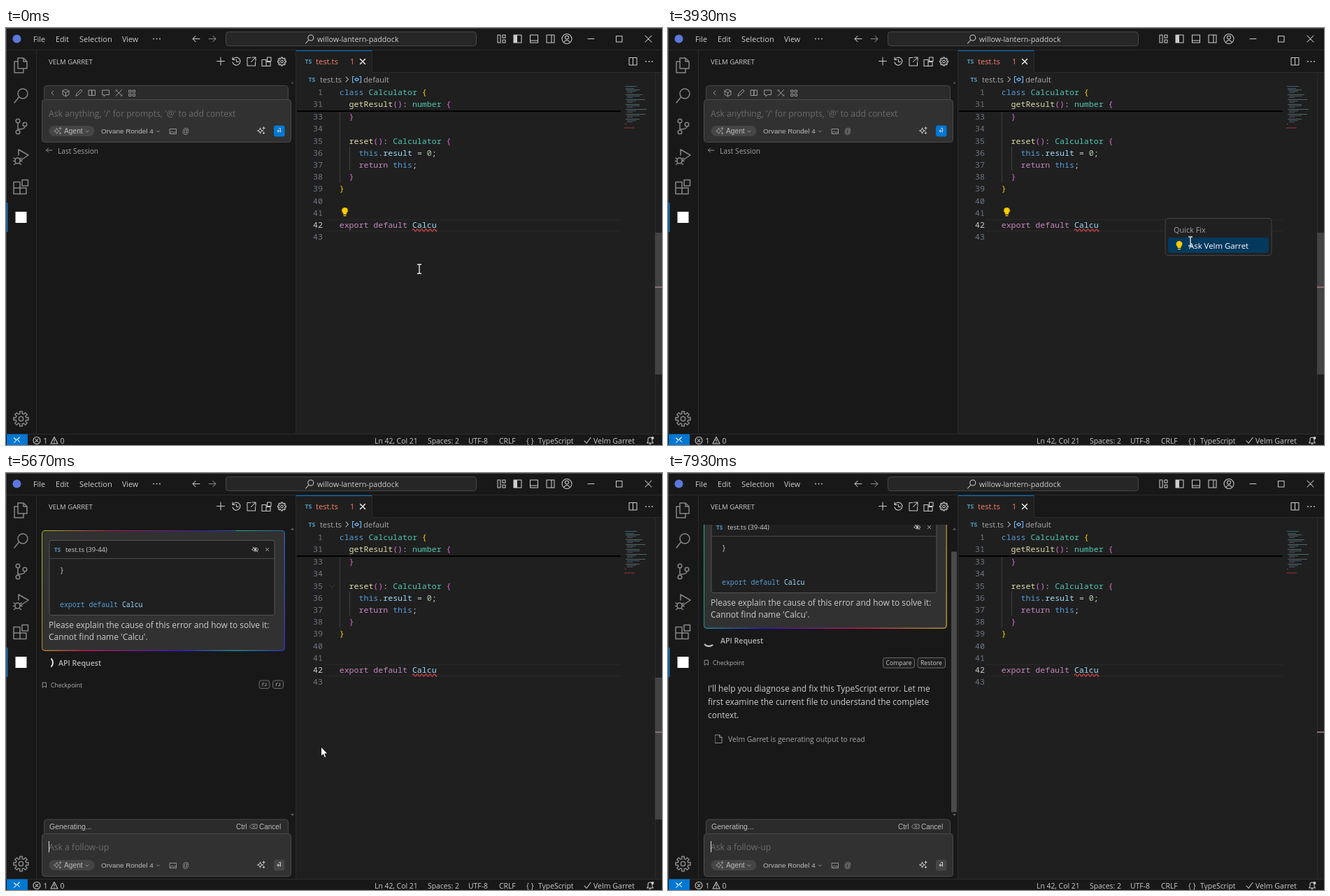
Animation, 938 px wide and 597 px high, one loop 8 s. Source, as an HTML page:

```html
<!DOCTYPE html>
<html lang="en">
<head>
<meta charset="utf-8">
<title>Quick fix walkthrough</title>
<style>
html, body { margin: 0; width: 100%; height: 100%; overflow: hidden; background: #1f1f1f; }
#stage { position: relative; width: 938px; height: 597px; overflow: hidden; }
#stage > svg { position: absolute; left: 0; top: 0; }
text { white-space: pre; fill: #ccc; font: 10.7px "Open Sans", sans-serif; }
.mono text, text.mono { font: 500 11.58px "Noto Sans Mono", monospace; }
.nums text { fill: #6e7681; text-anchor: end; }
.bar text { font-size: 10.4px; }
.arial { font: 10px "Liberation Sans", sans-serif; fill: #bbb; }
.ts { font-size: 8.6px; font-weight: 700; fill: #519aba; }
.i { fill: none; stroke: #ccc; stroke-width: 1.05; stroke-linecap: round; stroke-linejoin: round; }
.big { stroke: #868686; stroke-width: 1.5; }
.dim { stroke: #9d9d9d; stroke-width: .9; }
.gear { vector-effect: non-scaling-stroke; }
.k { fill: #569cd6; } .t { fill: #4ec9b0; } .f { fill: #dcdcaa; } .b { fill: #ffd700; }
.p { fill: #da70d6; } .c { fill: #c586c0; } .v { fill: #9cdcfe; } .n { fill: #b5cea8; }

/* one shared 8 s clock */
.a { animation: 8s linear infinite both; }
.cut { animation-timing-function: step-end; }
.start { animation-name: start; }
.busy { animation-name: busy; }
.tip { animation-name: tip; }
.menu { animation-name: menu; }
.thumb { animation-name: thumb; }
.fold { animation-name: fold; }
.beam { animation-name: beam; }
.arrow { animation-name: arrow; }
.caret { animation-name: caret; }
.dot2 { animation-name: dot2; }
.dot3 { animation-name: dot3; }
.wide { animation-name: wide; }
.tight { animation-name: tight; }
.late { animation-name: late; }
.type { animation-name: type; animation-timing-function: steps(7); }
#cursor { animation-name: move; }
#scroll { animation-name: scroll; animation-timing-function: step-end; }
@keyframes start { 0% { opacity: 1; } 52.125%, 100% { opacity: 0; } }
@keyframes busy { 0% { opacity: 0; } 52.125%, 100% { opacity: 1; } }
@keyframes tip { 0%, 12.5% { opacity: 0; } 15%, 34.99% { opacity: 1; } 35%, 100% { opacity: 0; } }
@keyframes menu { 0% { opacity: 0; } 35% { opacity: 1; } 50.875%, 100% { opacity: 0; } }
@keyframes thumb { 0%, 87.5% { opacity: 1; } 97.5%, 100% { opacity: 0; } }
@keyframes fold { 0%, 70% { opacity: 0; } 76.3%, 84.4% { opacity: 1; } 87.5%, 100% { opacity: 0; } }
@keyframes beam { 0% { opacity: 1; } 24.4% { opacity: 0; } 49.125% { opacity: 1; } 70%, 100% { opacity: 0; } }
@keyframes arrow { 0% { opacity: 0; } 24.4% { opacity: 1; } 49.125% { opacity: 0; } 70%, 100% { opacity: 1; } }
@keyframes caret {
  0% { opacity: 0; } 52.125% { opacity: 1; } 61.875% { opacity: 0; } 68.125% { opacity: 1; }
  74.375% { opacity: 0; } 80.625% { opacity: 1; } 86.875% { opacity: 0; } 93.125% { opacity: 1; } 99.375%, 100% { opacity: 0; }
}
@keyframes dot2 { 0% { fill: transparent; } 60.46% { fill: #bbb; } 77.13% { fill: transparent; } 85.46%, 100% { fill: #bbb; } }
@keyframes dot3 { 0% { fill: transparent; } 68.8% { fill: #bbb; } 77.13% { fill: transparent; } 93.8%, 100% { fill: #bbb; } }
@keyframes wide { 0% { opacity: 1; } 70% { opacity: 0; } 73.4%, 100% { opacity: 1; } }
@keyframes tight { 0% { opacity: 0; } 70% { opacity: 1; } 73.4%, 100% { opacity: 0; } }
@keyframes late { 0% { opacity: 0; } 95%, 100% { opacity: 1; } }
@keyframes type { 0%, 88.5% { clip-path: inset(0 100% 0 0); } 90.3%, 100% { clip-path: inset(0); } }
@keyframes scroll { 0% { transform: none; } 95%, 100% { transform: translateY(-32px); } }
@keyframes glow { 0%, 52.125% { background-position: 0 0; } 100% { background-position: 708.5px 0; } }
@keyframes spin {
  0%, 52.125% { transform: rotate(0); } 55.249% { transform: rotate(90deg); }
  55.25% { transform: rotate(0); } 100% { transform: rotate(1288.8deg); }
}
@keyframes move {
  0%, .875% { transform: translate(591px, 345px); }
  3.1% { transform: translate(576px, 318px); }
  5% { transform: translate(573px, 298px); }
  7.5%, 20.875% { transform: translate(588px, 285px); }
  25% { transform: translate(640px, 272px); }
  28.1% { transform: translate(727px, 262px); }
  30%, 35% { transform: translate(722px, 255px); animation-timing-function: ease-in-out; }
  42.5%, 61.6% { transform: translate(747px, 305.5px); animation-timing-function: ease-in-out; }
  70.4%, 83.75% { transform: translate(450px, 392px); }
  87.5% { transform: translate(400px, 440px); }
  93.4% { transform: translate(396px, 535px); }
  96.5%, 100% { transform: translate(394px, 604px); }
}

#chat { position: absolute; left: 44px; top: 74px; width: 361px; height: 416px; overflow: hidden; }
#scroll { position: absolute; left: -44px; top: -74px; width: 405px; height: 597px; }
#scroll > * { position: absolute; }
#scroll > svg { left: 0; top: 0; }
#msg {
  left: 50.5px; top: 81.5px; width: 348px; height: 173.5px; border-radius: 5px;
  background: repeating-linear-gradient(101.79deg, #1bbe84 0%, #331bbe 16%, #be1b55 33%, #a6be1b 55%, #be1b55 67%, #331bbe 85%, #1bbe84 99%) 0 0 / 200% 200%;
  animation-name: glow;
}
#spin {
  left: 49px; top: 261.5px; width: 15px; height: 15px; border: 2px solid transparent;
  border-top-color: #e4e4e4; border-radius: 50%; animation-name: spin;
}
#cursor { position: absolute; left: 0; top: 0; width: 1px; height: 1px; overflow: visible; }
</style>
</head>
<body>
<div id="stage">
<svg width="938" height="597">
  <defs>
    <g id="gear"><path id="teeth" class="gear"/><circle class="gear" r="1.8"/></g>
    <path id="blocks" d="M-6-3H0V6H-6zM0 0H6V6H-6M1.5-6.5H7V-1H1.5z"/>
    <g id="bulb" fill="#ffcc00">
      <path d="M0-6a4.3 4.3 0 0 1 2.4 7.9V4H-2.4V1.9A4.3 4.3 0 0 1 0-6z"/>
      <path d="M-2 5H2V6.3H-2z"/>
    </g>
    <path id="spark" d="M-1.5-3.5Q-1 0 2.5 .5Q-1 1-1.5 4.5Q-2 1-5.5 .5Q-2 0-1.5-3.5zM3.5-5V-1.5M1.8-3.2H5.2M3.5 2.5V5M2.2 3.8H4.8"/>
    <path id="down" d="M-2-1 0 1 2-1"/>
    <g id="composer">
      <rect x="51.5" y="102.5" width="356" height="61" rx="4" fill="#313131" stroke="#4b4b4b"/>
      <rect x="61.5" y="140" width="65" height="15" rx="7.5" fill="#454545"/>
      <use href="#spark" class="i dim" x="74" y="147"/>
      <text class="arial" x="83" y="150.5" style="font-size:10.2px">Agent</text>
      <use href="#down" class="i dim" x="116" y="148"/>
      <text class="arial" x="136" y="150.5" style="font-size:9.9px">Orvane Rondel 4</text>
      <use href="#down" class="i dim" x="217.5" y="148"/>
      <path class="i dim" d="M234.5 144.5h9v7h-9zM234.5 151l3-3 2 2 2-1.5 2 2"/>
      <text class="arial" x="252" y="151" style="fill:#9d9d9d">@</text>
      <use href="#spark" class="i" x="365" y="146.5"/>
    </g>
    <path id="enter" class="i" d="M388.5 147.5h4v-4h-2M390 145.5l-2 2 2 2M392.5 147.5v1.5"/>
  </defs>

  <!-- window frame -->
  <path fill="#181818" d="M0 0H938V64H415V597H0zM415 581H938V597H415z"/>
  <path fill="#1f1f1f" d="M415 32H523V64H415z"/>
  <path fill="none" stroke="#2b2b2b" d="M0 31.5H938M43.5 32V581M414.5 32V581M0 581.5H938M523.5 32V63.5H938"/>
  <path fill="none" stroke="#4a4a4a" d="M0 .5H938M.5 0V581"/>
  <path fill="#0078d4" d="M415 32H523V33H415zM1 250H2.5V292H1zM1 581.5H31V597H1z"/>
  <circle cx="15.5" cy="15.5" r="6" fill="#5c78dc"/>
  <text x="39" y="20">File</text><text x="71" y="20">Edit</text>
  <text x="105" y="20" style="font-size:11.1px">Selection</text><text x="166" y="20">View</text>
  <g fill="#ccc"><circle cx="211" cy="15.5" r=".9"/><circle cx="215.5" cy="15.5" r=".9"/><circle cx="220" cy="15.5" r=".9"/>
    <circle cx="915" cy="48" r=".9"/><circle cx="919.5" cy="48" r=".9"/><circle cx="924" cy="48" r=".9"/></g>
  <path class="i" d="M277 15.5H267M271 11.5l-4 4 4 4"/>
  <path class="i" style="stroke:#8a8a8a" d="M290 15.5H300M296 11.5l4 4-4 4"/>
  <rect x="314.5" y="5.5" width="358" height="20" rx="4" fill="#262626" stroke="#484848"/>
  <path class="i" d="M432.5 17.5l-4 4.5M431.8 14a4 4 0 1 1 8 0a4 4 0 1 1-8 0z"/>
  <text x="445" y="19.5">willow-lantern-paddock</text>
  <path class="i" d="M703 10h4v11h-4zM710 10h4v4h-4zM710 17h4v4h-4zM726 10h11v11h-11zM749.5 10h11v11h-11zM749.5 18h11M773 10h11v11h-11zM780 10v11"/>
  <path fill="#ccc" d="M726 10h5v11h-5z"/>
  <g class="i"><circle cx="802" cy="15.5" r="7"/><circle cx="802" cy="13.5" r="2.5"/><path d="M797.5 20.5q4.5-6 9 0M832 15.5h9M872.5 11.5h8.5v8.5h-8.5zM914 11l9 9M923 11l-9 9"/></g>

  <!-- activity bar -->
  <g class="i big">
    <path d="M17 43h8l5 5v10H17zM25 43v5h5M17 48h-5v16h13v-6"/>
    <path d="M18 99.5 12 107M17 94a7 7 0 1 1 14 0a7 7 0 1 1-14 0z"/>
    <circle cx="17" cy="133" r="2.8"/><circle cx="17" cy="149" r="2.8"/><circle cx="27" cy="138" r="2.8"/>
    <path d="M17 136v10M27 141q0 4-10 4"/>
    <path d="M18 182v-8l14 8-12 8M13 190q0-4 3.5-4t3.5 4q0 4-3.5 4t-3.5-4zM11 186l2.5 2M22 186l-2.5 2M10.5 190.5h2.5M20 190.5h3M11.5 195.5l2.5-2M21.5 195.5l-2.5-2"/>
    <path d="M11 220.5h9v17h-9zM11 229h18v8.5H11M23 217.5h8.5v8.5H23z"/>
    <use href="#gear" transform="translate(21.5 559.5) scale(1.75)"/>
  </g>
  <rect x="13.5" y="263" width="16" height="16" fill="#fff"/>

  <!-- side bar -->
  <text x="61" y="51.5" style="font-size:9.6px">VELM GARRET</text>
  <g class="i">
    <path d="M307 42v11M301.5 47.5h11M324.5 45a5.5 5.5 0 1 1-.5 4M324 42v3.5h3.5M329.5 45v3.5h3M350 42.5h-5v11.5h11.5v-5.5M352 42h5v5M357 42l-6.5 6.5"/>
    <use href="#blocks" x="372" y="48.5"/><use href="#gear" transform="translate(394.5 48)"/>
  </g>
  <g class="a cut start">
    <path d="M54.5 102V86.5a4 4 0 0 1 4-4H399.5a4 4 0 0 1 4 4V102" fill="#2b2b2b" stroke="#484848"/>
    <use href="#composer"/>
    <g class="i" style="stroke:#a8a8a8;stroke-width:.9">
      <path d="M68 90l-3 3 3 3M85.5 88l4.5 2.3v5l-4.5 2.5-4.5-2.5v-5zM81 90.3l4.5 2.4 4.5-2.4M85.5 92.7v5M100 97l1-3 6-6 2 2-6 6zM118.5 89h4.5v7.5h-4.5zM123 89h4.5v7.5h-4.5zM138 89h9.5v6.5h-5l-2.5 2.5v-2.5h-2zM157 88.5l9 9M165.5 88.5l-8.5 9M157 90.5l2-2M164 97.5l2-2"/>
      <path d="M176 89h3v3h-3zM181.5 89h3v3h-3zM176 94.5h3v3h-3zM181.5 94.5h3v3h-3z"/>
    </g>
    <text x="61" y="126.5" style="font-size:12.2px;fill:#6c6c6c">Ask anything, '/' for prompts, '@' to add context</text>
    <rect x="383" y="139.5" width="15.5" height="16" rx="3" fill="#0078d4"/><use href="#enter"/>
    <path class="i dim" d="M66 175H57.5M60.5 172l-3 3 3 3"/>
    <text x="74" y="179.5" style="font-size:10.2px;fill:#a2a2a2">Last Session</text>
    <circle cx="409.5" cy="78.5" r="1.5" fill="#4a4a4a"/>
  </g>
  <g class="a cut busy">
    <path d="M54.5 516V500a4 4 0 0 1 4-4H399.5a4 4 0 0 1 4 4V516" fill="#2b2b2b" stroke="#484848"/>
    <use href="#composer" y="414"/>
    <text class="arial" x="62" y="510" style="font-size:10.5px">Generating.<tspan class="a cut dot2">.</tspan><tspan class="a cut dot3">.</tspan></text>
    <text class="arial" x="329" y="509.5">Ctrl</text><text class="arial" x="362" y="509.5">Cancel</text>
    <path class="i dim" d="M348.5 506l3-3h7.5v6h-7.5zM353 504.5l3 3M356 504.5l-3 3"/>
    <text x="61" y="540" style="font-size:12.2px;fill:#6c6c6c">Ask a follow-up</text>
    <path class="a cut caret" d="M61.5 527V543" stroke="#ddd"/>
    <rect x="383" y="553.5" width="15.5" height="16" rx="3" fill="#454545"/><use href="#enter" y="414"/>
    <path fill="#606060" d="M407 81.5l2.5-3 2.5 3zM407 488l2.5 3 2.5-3z"/>
    <rect class="a cut late" x="405" y="112.5" width="8" height="373" fill="#4a4a4a"/>
  </g>

  <!-- editor -->
  <text class="ts" x="427.5" y="50.5">TS</text><text x="443" y="52" style="font-size:11.2px;fill:#f88070">test.ts</text>
  <text x="492" y="52" style="fill:#f88070">1</text>
  <path class="i" style="stroke:#fff;stroke-width:1.3" d="M506.5 44.5l7 7M513.5 44.5l-7 7"/>
  <path class="i" d="M891 42.5h11v10.5h-11zM896.5 42.5v10.5"/>
  <text class="ts" x="432.5" y="76.5">TS</text><text x="449" y="78" style="font-size:10.9px;fill:#a9a9a9">test.ts</text>
  <path class="i" d="M486 70l3.5 3.5-3.5 3.5"/>
  <path class="i" style="stroke:#75beff" d="M497.5 69.5h-2v8.5h2M505.5 69.5h2v8.5h-2M498.5 73.5l3-2 3 2-3 2.5z"/>
  <text x="511" y="78" style="font-size:11.2px;fill:#a9a9a9">default</text>
  <path stroke="#292929" d="M455 274.5H879M455 290.5H879"/>
  <path stroke="#404040" d="M477.5 120V221M491.5 170V204"/>
  <path stroke="#000" stroke-width="2" d="M416 119H879"/>
  <rect class="a tip" x="581" y="274" width="35" height="17" fill="#213040"/>
  <g class="mono nums" id="nums"></g>
  <g class="mono">
    <text x="476.7" y="95.5"><tspan class="k">class</tspan> <tspan class="t">Calculator</tspan> <tspan class="b">{</tspan></text>
    <text x="490.6" y="113"><tspan class="f">getResult</tspan><tspan class="p">()</tspan>: <tspan class="t">number</tspan> <tspan class="p">{</tspan></text>
    <text x="490.6" y="131.2" class="p">}</text>
    <text x="490.6" y="165.6"><tspan class="f">reset</tspan><tspan class="p">()</tspan>: <tspan class="t">Calculator</tspan> <tspan class="p">{</tspan></text>
    <text x="504.5" y="182.8"><tspan class="k">this</tspan>.<tspan class="v">result</tspan> = <tspan class="n">0</tspan>;</text>
    <text x="504.5" y="200"><tspan class="c">return</tspan> <tspan class="k">this</tspan>;</text>
    <text x="490.6" y="217.2" class="p">}</text>
    <text x="476.7" y="234.4" class="b">}</text>
    <text x="476.7" y="286"><tspan class="c">export default</tspan> <tspan class="v">Calcu</tspan></text>
  </g>
  <path fill="none" stroke="#f14c4c" stroke-width="1.1" d="M581 289.5q1.5-3.5 3 0t3 0 3 0 3 0 3 0 3 0 3 0 3 0 3 0 3 0 3 0 2 0"/>
  <use href="#bulb" class="a cut start" x="484.5" y="263"/>
  <path class="i a fold" d="M462.5 160l4 4 4-4"/>
  <g id="map" opacity=".6"></g>
  <path stroke="#2b2b2b" d="M928.5 64V581"/>
  <rect class="a thumb" x="928" y="293" width="10" height="203" fill="#434343"/>
  <path stroke="#8f6e6e" stroke-width="2" d="M928 371H938"/>

  <!-- status bar -->
  <g class="bar">
    <path class="i" style="stroke:#fff" d="M11.5 587l3.5 3-3.5 3.5M19.5 586l-3.5 3 3.5 3.5"/>
    <g class="i"><circle cx="44" cy="590.5" r="5"/><path d="M42 588.5l4 4M46 588.5l-4 4M69 585.5l5 9.5H64zM69 589v3M69 593.5v.2"/></g>
    <text x="53.5" y="594.5">1</text><text x="77.5" y="594.5">0</text>
    <text x="527" y="594.5">Ln 42, Col 21</text><text x="603" y="594.5">Spaces: 2</text>
    <text x="661" y="594.5">UTF-8</text><text x="705" y="594.5">CRLF</text>
    <text x="744" y="594.5">{ }</text><text x="761" y="594.5">TypeScript</text>
    <path class="i" d="M827 591l3 3.5 6-8M916.5 594h9l-1.5-2v-3q0-3-3-3t-3 3v3zM920 595.5h2"/>
    <circle cx="924.5" cy="587" r="2" fill="#ccc"/>
    <text x="840" y="594.5" style="font-size:10.6px">Velm Garret</text>
  </g>

  <!-- hover and menu -->
  <g class="a tip">
    <rect x="581.5" y="201.5" width="251" height="71" rx="2" fill="#202020" stroke="#454545"/>
    <path fill="#282828" d="M582 251.5H832V272H582z"/>
    <path stroke="#3c3c3c" d="M582 225.5H832M582 251.5H832"/>
    <g class="mono"><text x="588" y="217.5">Cannot find name 'Calcu'. <tspan fill="#8f8f8f">ts(2304)</tspan></text>
      <text x="588" y="242.5" class="v">any</text></g>
    <text x="588" y="265.5" style="fill:#4daafc;font-size:10.6px">View Problem (Alt+F8)</text>
    <text x="710" y="265.5" style="fill:#4daafc;font-size:10.4px">Quick Fix... (Ctrl+.)</text>
  </g>
  <g class="a cut menu">
    <rect x="711" y="272.5" width="152" height="53" rx="4" fill="#202020" stroke="#454545"/>
    <rect x="715" y="300" width="144" height="22" rx="3" fill="#04395e"/>
    <text x="723" y="292.5" style="font-size:10.9px;fill:#a0a0a0">Quick Fix</text>
    <use href="#bulb" x="731" y="311"/>
    <text x="745" y="316" style="font-size:11.4px;fill:#fff">Ask Velm Garret</text>
  </g>
</svg>

<div id="chat" class="a cut busy">
  <div id="scroll" class="a">
    <div id="msg" class="a"></div>
    <div id="spin" class="a"></div>
    <svg width="405" height="597">
      <rect x="52" y="83" width="345.5" height="170.5" rx="4" fill="#313131"/>
      <rect x="62" y="96.5" width="322" height="107" rx="3" fill="#1f1f1f" stroke="#545454"/>
      <path stroke="#484848" d="M62 122.5H384"/>
      <text class="ts" x="69" y="112.5" style="font-size:8px">TS</text>
      <text x="85" y="113" style="font-size:9.5px">test.ts (39-44)</text>
      <path class="i" style="stroke-width:.9" d="M352 109.5q4.5-5.5 9 0q-4.5 5.5-9 0zM353 106l7 7M371.5 107.5l4 4M375.5 107.5l-4 4"/>
      <circle class="i" cx="356.5" cy="109.5" r="1.3"/>
      <text class="mono" x="77" y="143" style="font-size:9.9px">}</text>
      <text class="mono" x="77" y="192" style="font-size:9.9px"><tspan class="k">export default</tspan> <tspan class="v">Calcu</tspan></text>
      <g style="--s:11.95px">
        <text x="61" y="222" style="font-size:var(--s)">Please explain the cause of this error and how to solve it:</text>
        <text x="61" y="239" style="font-size:var(--s)">Cannot find name 'Calcu'.</text>
        <text class="a type" x="57" y="344.5" style="font-size:var(--s)">I'll help you diagnose and fix this TypeScript error. Let me</text>
        <text class="a type" x="57" y="363.5" style="font-size:var(--s);animation-delay:.14s">first examine the current file to understand the complete</text>
        <text class="a type" x="57" y="382.5" style="font-size:var(--s);animation-delay:.28s">context.</text>
      </g>
      <text x="75" y="275.5" style="font-size:10.6px;font-weight:600;fill:#b4b4b4">API Request</text>
      <path class="i dim" d="M52.5 300h5v7l-2.5-2-2.5 2z"/>
      <text x="64" y="307" style="font-size:8.6px;fill:#b0b0b0">Checkpoint</text>
      <g class="a cut wide">
        <rect x="307.5" y="296.5" width="45" height="14.5" rx="3" fill="#1f1f1f" stroke="#6a6a6a"/>
        <rect x="357" y="296.5" width="39.5" height="14.5" rx="3" fill="#1f1f1f" stroke="#6a6a6a"/>
        <text x="311.5" y="307" style="font-size:8.7px">Compare</text><text x="361" y="307" style="font-size:8.7px">Restore</text>
      </g>
      <g class="a cut tight">
        <rect x="362" y="297" width="15" height="11.5" rx="3" fill="#1f1f1f" stroke="#6a6a6a"/>
        <rect x="381.5" y="297" width="15" height="11.5" rx="3" fill="#1f1f1f" stroke="#6a6a6a"/>
        <path class="i dim" d="M367 304.5v-3.5h2M372 301v3.5h-2M386.5 304.5v-3.5h2M391.5 301v3.5h-2"/>
      </g>
      <g class="a cut late">
        <path class="i dim" d="M67.5 407h6l3.5 3.5v8h-9.5zM73.5 407v3.5h3.5"/>
        <text x="86" y="417" style="font-size:10.4px;fill:#a6a6a6">Velm Garret is generating output to read</text>
      </g>
    </svg>
  </div>
</div>

<svg id="cursor" class="a">
  <g class="a cut beam">
    <path fill="none" stroke="#000" stroke-opacity=".5" stroke-width="2.6" d="M-3-6.5H3M0-6.5V6.5M-3 6.5H3"/>
    <path fill="none" stroke="#fff" stroke-width="1.3" d="M-3-6.5H-.8L0-6 .8-6.5H3M0-6V6M-3 6.5H-.8L0 6 .8 6.5H3"/>
  </g>
  <path class="a cut arrow" fill="#fff" stroke="#000" stroke-width=".8" d="M.5 0V13.5L3.5 10.7 5.6 15.6 7.8 14.7 5.8 9.9H10z"/>
</svg>
</div>

<script>
const byId = id => document.getElementById(id);
const rect = (x, y, w, fill) => `<rect x="${x}" y="${y}" width="${w}" height="1" fill="${fill}"/>`;

// gear outline: eight teeth, four corners each
const corner = (r, a) => `${(r * Math.cos(a)).toFixed(2)} ${(r * Math.sin(a)).toFixed(2)}`;
let teeth = [];
for (let i = 0; i < 8; i++) {
  const a = i * Math.PI / 4;
  teeth.push(corner(4.3, a - .24), corner(6.1, a - .18), corner(6.1, a + .18), corner(4.3, a + .24));
}
byId('teeth').setAttribute('d', `M${teeth.join('L')}z`);

// line numbers: two sticky rows, then 33 to 43
let nums = '<text x="453" y="95.5">1</text><text x="453" y="113">31</text>';
for (let n = 33; n <= 43; n++) {
  const tint = n === 42 ? ' style="fill:#ccc"' : '';
  nums += `<text x="453" y="${131.2 + (n - 33) * 17.2}"${tint}>${n}</text>`;
}
byId('nums').innerHTML = nums;

// minimap: header, repeated method blocks, last line with the error
let map = rect(885, 83, 17, '#4e8fb0') + rect(886, 86, 12, '#5b86a8');
for (let m = 0; m < 7; m++) {
  const y = 88 + m * 7;
  map += rect(886, y, m === 4 ? 30 : 20 + m % 3 * 4, '#6f9a8c')
    + rect(888, y + 2, 13 + m % 2 * 5, '#56809e') + rect(888, y + 4, 8, '#7d6a90');
}
map += rect(885, 137, 1.5, '#aa9840') + rect(884, 142.5, 15, '#e84848');
byId('map').innerHTML = map;
</script>
</body>
</html>
```
